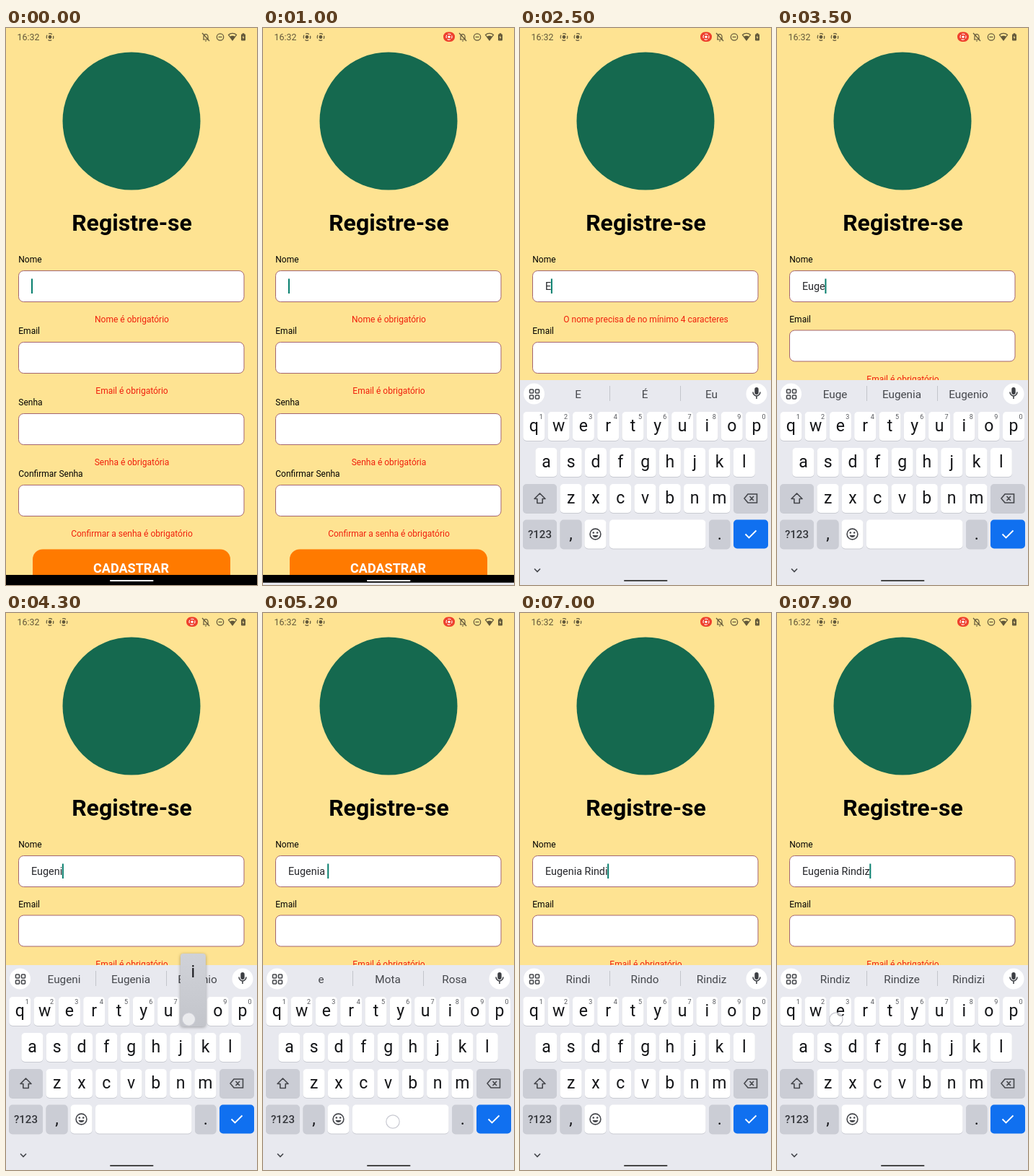
Write an HTML page that moves like this. It is 348 px wide and 772 px high and loops after 8 s.

```html
<!DOCTYPE html>
<html lang="pt-BR">
<head>
<meta charset="utf-8">
<title>Registre-se</title>
<style>
  html, body { margin: 0; width: 100%; height: 100%; overflow: hidden; background: #fee392; }
  svg { display: block; width: 348px; height: 772px; font-family: Roboto, sans-serif; }
  text { white-space: pre; }
  .mid { text-anchor: middle; }
  .label { font-size: 12px; }
  .error { font-size: 12px; fill: #f0200c; text-anchor: middle; }
  .field { fill: #fff; stroke: #9a5666; stroke-width: .9; }
  .key { filter: drop-shadow(0 1px 0 #c9cbd2); }
  .letter { font-size: 23px; fill: #141518; text-anchor: middle; }
  .hint { font-size: 9px; fill: #55575c; text-anchor: middle; }
  .word { font-size: 15.3px; fill: #45474c; text-anchor: middle; }
  .line { fill: none; stroke: #44464b; stroke-width: 1.6; }
</style>
</head>
<body>
<svg id="stage" viewBox="0 0 348 772"></svg>
<script>
const LOOP = 8000, PITCH = 34.3, COMMIT = 110;
const ROWS = [['qwertyuiop', 19.3, 552], ['asdfghjkl', 36.4, 602], ['zxcvbnm', 70.6, 652]];

// Touches: start time, key, optional finger offset
const TAPS = [
  [2190, 'E'], [2640, 'u'], [2940, 'g'], [3190, 'e'], [3880, 'n'], [4190, 'i'], [4590, 'a'],
  [5080, ' ', 0, 0], [5380, 'shift'], [5600, 'R'], [5800, 'i'], [5990, 'n'],
  [6120, 'd', -19, -2], [6490, 'i'], [7590, 'z'], [7870, 'e']
];
const FIELD_TAP = 820;
const SUGGESTIONS = {
  'E': 'E,É,Eu', 'Eu': 'Eu,Eu te,Eua', 'Eug': 'Eug,Eugenia,Eugenio', 'Euge': 'Euge,Eugenia,Eugenio',
  'Eugen': 'Eugen,Eugenia,Eugenio', 'Eugeni': 'Eugeni,Eugenia,Eugenio', 'Eugenia': 'Eugenia,Eugenio,Eugênia',
  '': 'e,Mota,Rosa', 'R': 'R,Rua,Rosa', 'Ri': 'Ri,Rio,Rir', 'Rin': 'Rin,Viu,Vou',
  'Rind': 'Rind,Rindo,Vindo', 'Rindi': 'Rindi,Rindo,Rindiz', 'Rindiz': 'Rindiz,Rindize,Rindizi',
  'Rindize': 'Rindize,Rindizi,Rindizes'
};

const spots = { ' ': [180, 705], shift: [27, 652] };
const rect = (x, y, w, h, r, fill, extra = '') =>
  `<rect x="${x}" y="${y}" width="${w}" height="${h}" rx="${r}" fill="${fill}" ${extra}/>`;
const text = (x, y, cls, str, extra = '') => `<text x="${x}" y="${y}" class="${cls}" ${extra}>${str}</text>`;
const circle = (x, y, r, fill, extra = '') => `<circle cx="${x}" cy="${y}" r="${r}" fill="${fill}" ${extra}/>`;
const path = (d, extra = 'class="line"') => `<path d="${d}" ${extra}/>`;
const at = (x, y, body, extra = '') => `<g transform="translate(${x} ${y})" ${extra}>${body}</g>`;
const key = (x, y, w, fill = '#fff', h = 40) => rect(x, y, w, h, 5, fill, 'class="key"');

function field(label, y, error, id = '') {
  return text(17.3, y, 'label', label) + rect(17.5, y + 11.5, 312.5, 43, 7, '#fff', 'class="field"') +
    text(174.5, y + 83, 'error', error, id);
}

function statusBar() {
  const ink = '#62583a';
  const rec = circle(0, 0, 2.4, ink) +
    circle(0, 0, 4.8, 'none', `stroke="${ink}" stroke-width="1.2" stroke-dasharray="5 2.54" stroke-dashoffset="2.5"`);
  const stroke = `fill="none" stroke="${ink}" stroke-width="1.2"`;
  return text(15.5, 17, '', '16:32', `font-size="12.4" fill="${ink}"`) + at(61, 12.5, rec) +
    `<g id="recording">${at(80, 12.5, rec)}${rect(250, 5.5, 16, 13.5, 6.5, '#ee3f2c')}
    ${circle(258, 12.2, 1.7, '#fff')}${circle(258, 12.2, 4, 'none', 'stroke="#fff" stroke-width="1.1" stroke-dasharray="4.6 1.68" stroke-dashoffset="2.3"')}</g>` +
    at(277, 12, path('M-4 4H4M-3 4V0A3 3.4 0 0 1 3 0V4M-1 6H1M-5-5L5 6', stroke)) +
    at(297, 12.5, circle(0, 0, 4.7, 'none', stroke) + path('M-2.5 0H2.5', stroke)) +
    at(314, 12, path('M-5.5-2.5A8 8 0 0 1 5.5-2.5L0 5Z', stroke) + path('M-3.6 0A6 6 0 0 1 3.6 0L0 5Z', `fill="${ink}"`)) +
    at(329, 12.5, rect(-3, -4, 6, 9, 1, ink) + rect(-1.3, -5.2, 2.6, 2, 0, ink) + path('M.4-2.5L-1.5 1H0L-.4 3.5L1.5 0H0Z', 'fill="#fee392"'));
}

function toolbar() {
  const gear = circle(0, 0, 4.2, 'none', 'stroke="#4a4c51" stroke-width="3.4"') +
    circle(0, 0, 6.4, 'none', 'stroke="#4a4c51" stroke-width="2.6" stroke-dasharray="3.4 3.3"');
  const palette = path('M0-7.5A7.5 7.5 0 0 0 0 7.5C2 7.5 2 6 1.3 5C.6 3.5 1.5 2.7 3 2.7H4.5C9 2.5 8-7.5 0-7.5Z', 'fill="#4a4c51"') +
    [[-4.4, 0], [-2.3, -3.8], [2.3, -3.8], [4.7, -.5]].map(p => circle(...p, 1.2, '#e8e9ef')).join('');
  const sticker = path('M-7-7H7V3L3 7H-7ZM7 2H2V7M-3-3V-1M2-3V-1M-4 2Q-1 5 1 2',
    'fill="none" stroke="#a5a7ad" stroke-width="1.8" stroke-linejoin="round"');
  return at(71.5, 507, sticker) +
    text(122.5, 511.8, 'mid', 'GIF', 'font-size="13.5" font-weight="700" fill="#a9abb1"') +
    at(174, 507, gear) + rect(218, 500, 14, 14, 1, '#55575c') + at(276.5, 507, palette);
}

function keyboard() {
  let out = rect(0, 488, 348, 284, 0, '#e8e9ef');
  out += circle(19.5, 507, 14.5, '#fff') + circle(328, 507, 14.5, '#fff');
  for (const x of [13.5, 21.5]) for (const y of [501, 509]) out += rect(x, y, 5, 5, 1, 'none', 'class="line"');
  out += at(328, 506, rect(-2.7, -8, 5.4, 10, 2.7, '#3c3e43') + path('M-5-1.5A5 5.4 0 0 0 5-1.5M0 4.5V8'));
  out += `<g id="toolbar">${toolbar()}</g><g id="strip">` +
    [80.5, 173, 265.5].map(x => text(x, 513, 'word', '')).join('') +
    path('M124.5 496V517M222.5 496V517', 'stroke="#c3c5cb"') + '</g>';
  ROWS.forEach(([letters, x0, y], row) => [...letters].forEach((ch, i) => {
    const x = x0 + i * PITCH;
    spots[ch] = [x, y];
    out += key(x - 15, y - 20, 30) + text(x, y + 7, 'letter', ch, `data-char="${ch}"`);
    if (!row) out += text(x + 10, y - 10, 'hint', (i + 1) % 10);
  }));
  const grey = '#cbcdd5';
  out += key(4, 632, 47, grey) + key(296, 632, 48, grey) + key(4, 681.5, 47, grey) + key(55.5, 681.5, 30, grey) +
    key(89.5, 681.5, 30) + key(124, 681.5, 133.5) + key(262, 681.5, 29.5, grey) + rect(296, 681.5, 48, 40, 5, '#1070f0');
  out += at(27.5, 652, path('M0-7L7.5 .5H3.7V6.5H-3.7V.5H-7.5Z', 'id="shift" class="line" stroke-linejoin="round"'));
  out += at(320, 652, path('M-9 0L-4-6H8.5V6H-4ZM-1.5-3L4 3M4-3L-1.5 3'));
  out += text(27.5, 707, 'mid', '?123', 'font-size="15" font-weight="500" fill="#33353a"');
  out += text(70.5, 709, 'letter', ',') + text(276.7, 709, 'letter', '.');
  out += at(104.5, 701.5, circle(0, 0, 7.4, 'none', 'class="line"') + circle(-2.7, -2, 1.3, '#44464b') +
    circle(2.7, -2, 1.3, '#44464b') + path('M-4 1.5A4.2 4.2 0 0 0 4 1.5Z', 'fill="#44464b"'));
  out += path('M312.5 701.5L317.5 706.5L327.5 696.5', 'fill="none" stroke="#fff" stroke-width="1.8"');
  out += `<g id="nav">${path('M20 749.5L24 753.5L28 749.5')}</g>` + rect(144, 765, 60.5, 2, 1, '#fff', 'id="pill"');
  return out;
}

const stage = document.getElementById('stage');
stage.innerHTML = `<defs><linearGradient id="bubble" x2="0" y2="1">
    <stop stop-color="#d0d2d8"/><stop offset="1" stop-color="#c3c5cb"/></linearGradient></defs>` +
  rect(0, 0, 348, 772, 0, '#fee392') + statusBar() + circle(174, 129, 95.5, '#15694f') +
  text(174.5, 281, 'mid', 'Registre-se', 'font-size="32" font-weight="700"') +
  field('Nome', 325, '', 'id="nameError"') +
  `<g id="rest">${field('Email', 424, 'Email é obrigatório')}${field('Senha', 523, 'Senha é obrigatória')}
  ${field('Confirmar Senha', 622, 'Confirmar a senha é obrigatório')}${rect(37, 722.5, 274, 60, 14, '#ff7a00')}
  ${text(173.5, 755, 'mid', 'CADASTRAR', 'font-size="18" font-weight="700" fill="#fff"')}</g>` +
  text(35, 363.3, '', '', 'id="typed" font-size="14.4" fill="#25262a"') +
  rect(35, 347.5, 2, 20.5, 0, '#087f6e', 'id="caret"') +
  rect(0, 758, 348, 14, 0, '#000') + rect(144, 765, 60.5, 2, 1, '#fff') +
  `<g id="keyboard">${keyboard()}</g>
  <g id="popup">${rect(-17.5, -80, 35, 101, 4, 'url(#bubble)', 'style="filter:drop-shadow(0 1px 2px #0005)"')}
  ${text(0, -47, 'letter', '')}</g>` +
  circle(0, 0, 9.2, '#fff', 'id="finger" fill-opacity=".65" stroke="#c9cad2" stroke-width="1.2"');

const el = id => document.getElementById(id);
const show = (id, on) => el(id).setAttribute('visibility', on ? 'visible' : 'hidden');
const move = (id, x, y) => el(id).setAttribute('transform', `translate(${x} ${y})`);
const clamp = v => Math.max(0, Math.min(1, v));
const setText = (node, str) => { if (node.textContent !== str) node.textContent = str; };
const letters = [...stage.querySelectorAll('[data-char]')];
const words = [...el('strip').querySelectorAll('text')];

function draw(t) {
  let typed = '', caps = true, blinkFrom = t < 900 ? 0 : 900;
  for (const [start, ch] of TAPS) {
    if (t < start + COMMIT) break;
    caps = ch === 'shift';
    if (caps) continue;
    typed += ch;
    blinkFrom = start + COMMIT;
  }

  show('recording', t >= 400);
  setText(el('typed'), typed);
  el('caret').setAttribute('x', 35 + (typed ? el('typed').getComputedTextLength() - .3 : 0));
  show('caret', (t - blinkFrom) % 1000 < 500);
  setText(el('nameError'), !typed ? 'Nome é obrigatório' : typed.length < 4 ? 'O nome precisa de no mínimo 4 caracteres' : '');
  move('rest', 0, typed.length < 4 ? 0 : -16.5);

  move('keyboard', 0, 284 * (1 - clamp((t - 1000) / 260)) ** 3);
  show('keyboard', t >= 1000);
  const nav = clamp((t - 1250) / 250), shade = Math.round(255 - 185 * nav);
  el('nav').setAttribute('opacity', nav);
  el('pill').setAttribute('fill', `rgb(${shade},${shade},${shade})`);

  for (const node of letters) {
    const ch = node.dataset.char;
    setText(node, caps ? ch.toUpperCase() : ch);
    node.setAttribute('y', spots[ch][1] + (caps ? 8 : 7));
  }
  el('shift').style.fill = caps ? '#44464b' : 'none';
  el('toolbar').style.display = typed ? 'none' : '';
  el('strip').style.display = typed ? '' : 'none';
  if (typed) {
    const list = SUGGESTIONS[typed.split(' ').pop()].split(',');
    words.forEach((node, i) => setText(node, list[i]));
  }

  const tap = TAPS.findLast(([start]) => t >= start);
  const age = tap ? t - tap[0] : LOOP;
  const isLetter = tap && tap[1].length === 1 && tap[1] !== ' ';
  show('popup', isLetter && age >= 50 && age < 150);
  let touchAge = t - FIELD_TAP;
  if (tap) {
    const [, ch, dx = -6, dy = 11] = tap;
    const [x, y] = spots[ch === 'shift' ? ch : ch.toLowerCase()];
    touchAge = age;
    move('popup', x, y);
    setText(el('popup').querySelector('text'), ch);
    move('finger', x + dx, y + dy);
  } else move('finger', 180, 360);
  show('finger', touchAge >= 0 && touchAge < 160);
}

(function frame() {
  draw(performance.now() % LOOP);
  requestAnimationFrame(frame);
})();
</script>
</body>
</html>
```
